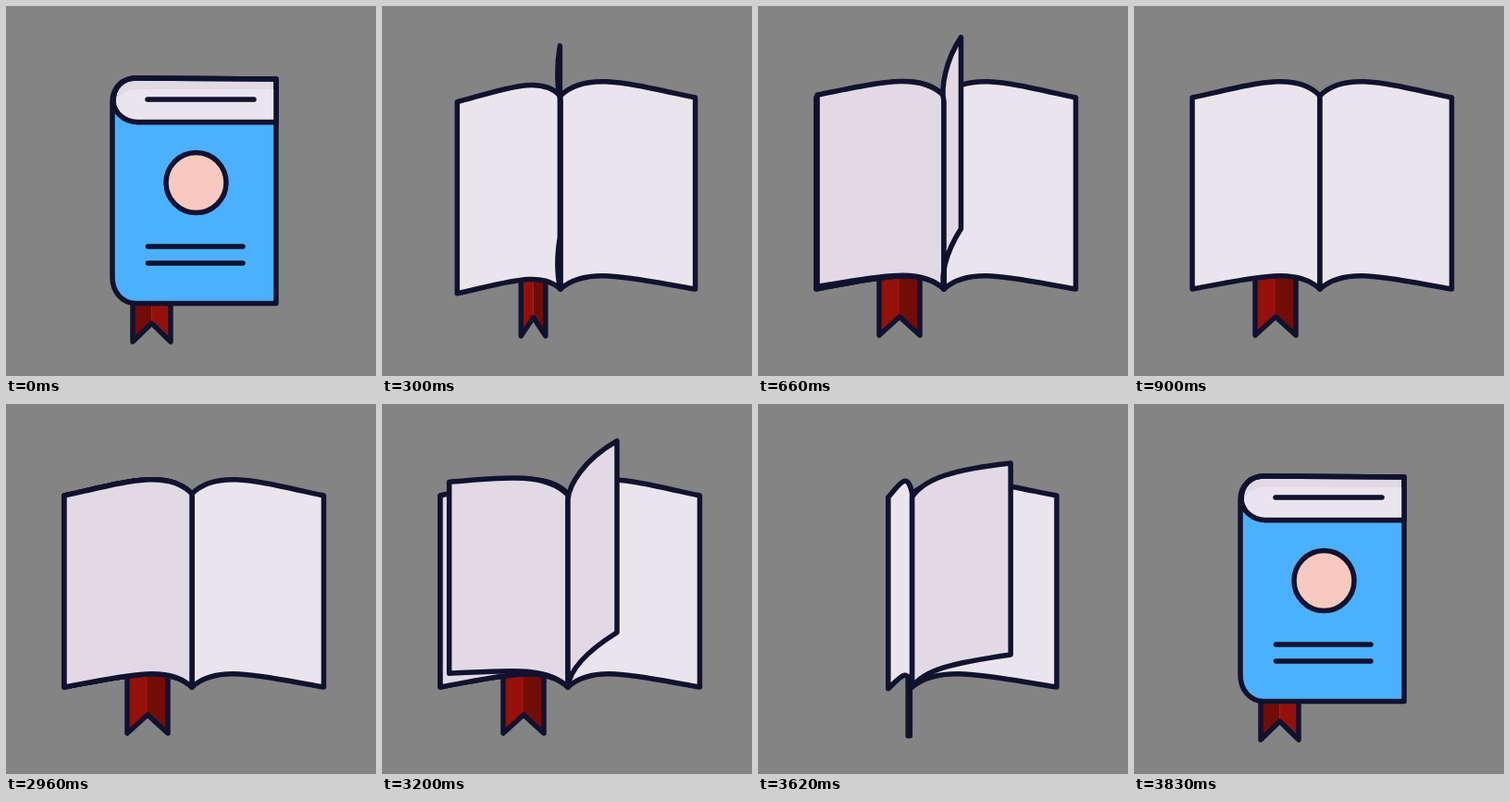
An HTML page with a canvas that plays this animation: 400 px wide and 400 px high, repeating every 8860 ms.

```html
<!DOCTYPE html>
<html lang="en">
<head>
<meta charset="utf-8">
<title>Book</title>
<style>
html, body { margin: 0; width: 100%; height: 100%; overflow: hidden; background: #848484; }
canvas { display: block; width: 400px; height: 400px; }
</style>
</head>
<body>
<canvas id="stage"></canvas>
<script>
const canvas = document.getElementById('stage');
const dpr = window.devicePixelRatio || 1;
canvas.width = canvas.height = 400 * dpr;
const ctx = canvas.getContext('2d');

const LOOP = 8860, STEP = 30, OPEN = 900, CLOSED_AT = 3830, TURN = 375;
const INK = '#11122f', LIGHT = '#eae5ec', SHADE = '#e1dae5', BLUE = '#4bb1ff';
const LEFT_W = 138;
// When each leaf starts to turn, and how high its free edge rises
const LEAVES = [{ start: 112, rise: 56 }, { start: 300, rise: 66 }, { start: 488, rise: 66 }];

const mix = (a, b, u) => a + (b - a) * u;
const clamp = u => Math.min(1, Math.max(0, u));
const smooth = u => clamp(u) ** 2 * (3 - 2 * clamp(u));
const turned = ms => Math.PI * clamp(ms / TURN);

function paint(path, fill) {
  if (fill) {
    ctx.fillStyle = fill;
    ctx.fill(path);
  }
  ctx.stroke(path);
}

// A stiff half of the book, w wide (negative to the left), its outer part lowered by sag
function half(spine, w, sag) {
  const x1 = spine + 0.19 * w, x2 = spine + 0.51 * w, edge = spine + w;
  const p = new Path2D();
  p.moveTo(spine, 97);
  p.bezierCurveTo(x1, 70 + sag, x2, 84 + sag, edge, 99 + sag);
  p.lineTo(edge, 306 + sag);
  p.bezierCurveTo(x2, 294 + sag, x1, 281 + sag, spine, 306);
  p.closePath();
  paint(p, LIGHT);
}

// A loose leaf that bends while its free edge rises
function leaf(spine, rightW, { a, rise }) {
  const k = Math.cos(a), s = Math.max(0, Math.sin(a)), b = Math.abs(k);
  const w = k * (k < 0 ? LEFT_W : rightW);
  const lift = rise * s ** 1.5, bulge = 4 * s ** 8;
  const x1 = spine + 0.19 * w * b - bulge;
  const x2 = spine + 0.51 * w * (0.45 + 0.55 * b) - bulge;
  const edge = spine + w;
  const p = new Path2D();
  p.moveTo(spine, 97 + 0.1 * lift);
  p.bezierCurveTo(x1, 70 + 0.3 * lift, x2, 84 - 0.38 * lift, edge, 99 - lift);
  p.lineTo(edge, 306 - lift);
  p.bezierCurveTo(x2, 294 - 0.4 * lift, x1, 281 + 0.16 * lift, spine, 306);
  p.closePath();
  paint(p, SHADE);
}

function ribbon(spine, k, q) {
  const flip = (1 - Math.sign(k) * Math.abs(k) ** 2.5) / 2;
  const inner = spine + mix(22, -26, flip);
  const outer = spine + mix(63, -70, flip);
  const mid = (inner + outer) / 2, end = mix(363, 356, q);
  ctx.fillStyle = '#720c06';
  ctx.fill(new Path2D(`M${inner} 290V${end}L${mid} ${end - 20}V290Z`));
  ctx.fillStyle = '#94110b';
  ctx.fill(new Path2D(`M${outer} 290V${end}L${mid} ${end - 20}V290Z`));
  paint(new Path2D(`M${inner} 290V${end}L${mid} ${end - 20}L${outer} ${end}V290Z`));
}

// The closed book, squeezed towards its spine while the cover lifts
function cover(spine, k, lift) {
  const m = new DOMMatrix([k, -lift / 177, 0, 1, spine, 0]).translate(-115, 0);
  const draw = (d, fill) => {
    const p = new Path2D();
    p.addPath(new Path2D(d), m);
    paint(p, fill);
  };
  const block = 'M292 125.5H142C127 125 117 115 116 103C116 88 126 78 140 78L292 79Z';
  draw('M115 103C115 88 126 78 140 78L292 79V321.5H140C125 321 115 309 115 293Z', BLUE);
  draw(block, SHADE);
  const glow = new Path2D();
  glow.addPath(new Path2D('M292 125H142C127 125 119 115 118 106C121 94 132 90 146 90H292Z'), m);
  ctx.fillStyle = LIGHT;
  ctx.fill(glow);
  draw(block);
  draw('M153 101H268');
  draw('M238 191A32.5 32.5 0 1 1 173 191A32.5 32.5 0 1 1 238 191Z', '#f8c9c1');
  draw('M153.5 260H256M153.5 278H256');
}

function scene(p) {
  ctx.setTransform(dpr, 0, 0, dpr, 0, 0);
  ctx.fillStyle = '#848484';
  ctx.fillRect(0, 0, 400, 400);
  ctx.strokeStyle = INK;
  ctx.lineWidth = 5.5;
  ctx.lineCap = ctx.lineJoin = 'round';

  const q = smooth(p / 370);
  const spine = mix(115, 201, q), rightW = mix(292, 343.5, q) - spine;
  const turn = turned(p), k = Math.cos(turn), sway = Math.sin(2 * turn);

  ribbon(spine, k, q);
  if (p > 0) {
    if (k < 0) half(spine, LEFT_W * k, -5 * sway);
    half(spine, rightW, 0);
  }

  if (p < OPEN) {
    const moving = LEAVES.map(l => ({ a: turned(p - l.start), rise: l.rise })).filter(l => l.a > 0);
    const isLeft = l => l.a > Math.PI / 2;
    const draw = l => leaf(spine, rightW, l);
    moving.filter(isLeft).forEach(draw);
    moving.filter(l => !isLeft(l)).reverse().forEach(draw);
  }

  if (k > 0) cover(spine, k, 20 * sway);
}

function frame(now) {
  const t = now % LOOP;
  const p = t < OPEN
    ? Math.floor(t / STEP) * STEP
    : Math.min(OPEN, Math.max(0, Math.ceil((CLOSED_AT - t) / STEP) * STEP));
  scene(p);
  requestAnimationFrame(frame);
}
requestAnimationFrame(frame);
</script>
</body>
</html>
```
